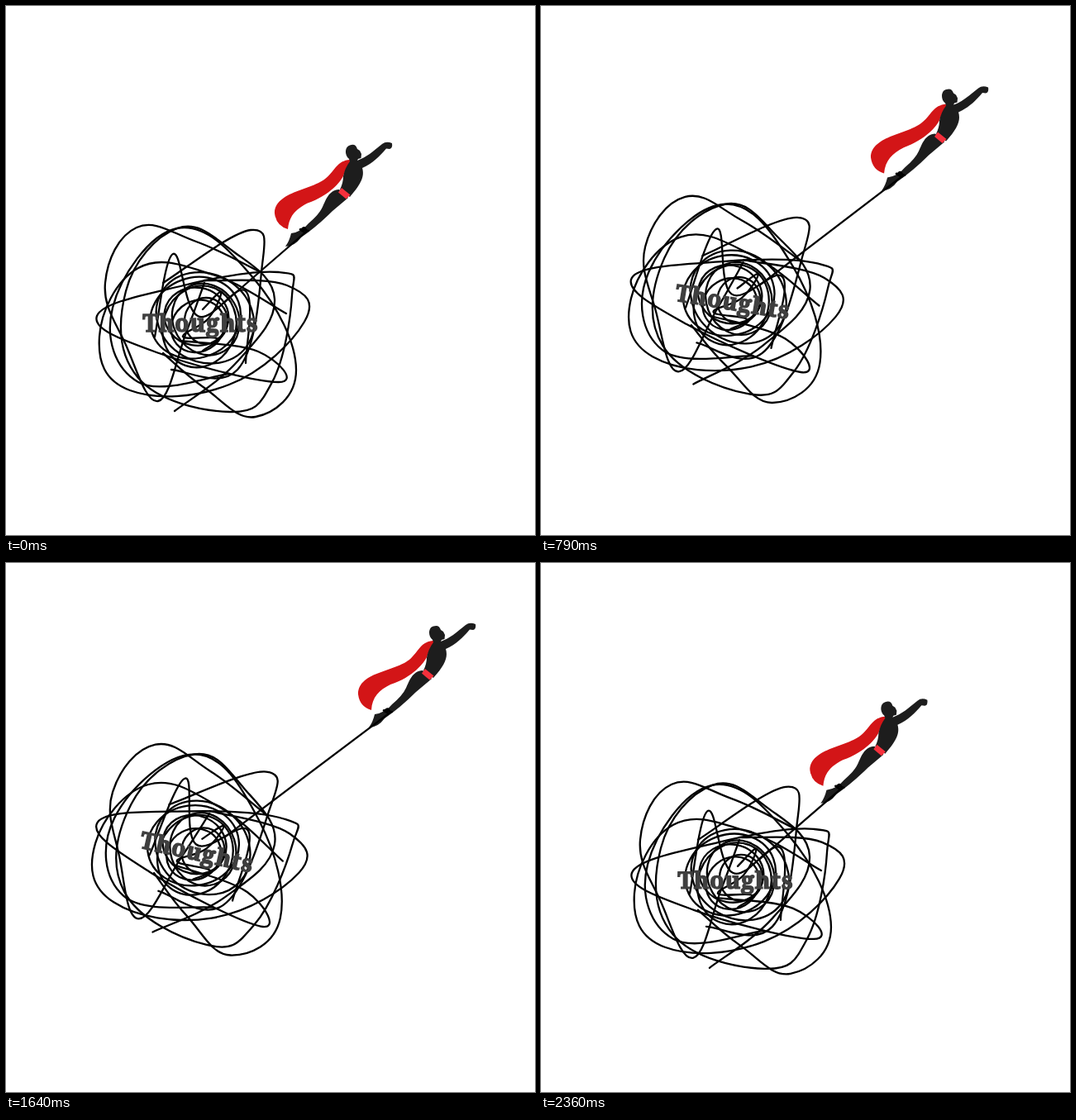
An HTML page that plays this animation: 640 px wide and 640 px high, repeating every 2.43 s.

```html
<!DOCTYPE html>
<html lang="en">
<head>
<meta charset="utf-8">
<title>Thoughts</title>
<style>
  html, body { margin: 0; width: 100%; height: 100%; overflow: hidden; background: #fff; }
  svg { display: block; width: 100%; height: 100%; }
  .line { fill: none; stroke: #000; stroke-width: 2.3; stroke-linecap: round; stroke-linejoin: round; }
  text { font: 900 28px "Noto Serif", "Liberation Serif", serif; letter-spacing: 1px;
    fill: #3f3f3f; stroke: #3f3f3f; stroke-width: 1.5; text-anchor: middle; }
</style>
</head>
<body>
<svg viewBox="0 0 640 640">
  <g id="ball">
    <g id="tangle" class="line"></g>
    <text x="235.5" y="394">Thoughts</text>
  </g>
  <g id="hero">
    <path id="cape" fill="#d31517"/>
    <g fill="#1d1d1d">
      <path d="M415,185C409,180 410,170 416,168.500Q423,166 425,173L428,175L430,179L429.500,184L426,185L425,187
        C436,183 444,176 455,167Q460,163 467,166Q468,172 464,173L460,172.500C452,182 444,190 431,196
        C434,206 430,215 416,231L404,222Q408,214 408,206Q410,196 416,188Z"/>
      <path d="M403,222C390,223 387,235 383,243Q379,252 366,263Q358,273 345,275Q343,284 338,291
        Q349,291 357,280Q376,267 395,248L414,232Z"/>
    </g>
    <path d="M406,220L416.500,228.500L411.500,233.500L402,225.500Z" fill="#f5303c"/>
  </g>
  <path id="rope" class="line"/>
  <path id="knot" class="line" d="M358,270Q361,266 363,271T358,272T366,272"/>
</svg>
<script>
const $ = id => document.getElementById(id);

// Smooth curve through a few key points
function curve(text) {
  const p = text.split(' ').map(pair => pair.split(',').map(Number));
  let d = 'M' + p[0];
  for (let i = 0; i < p.length - 1; i++) {
    const a = p[i - 1] || p[i], b = p[i], c = p[i + 1], e = p[i + 2] || c;
    const c1 = b.map((v, n) => v + (c[n] - a[n]) / 5);
    const c2 = c.map((v, n) => v - (e[n] - b[n]) / 5);
    d += `C${c1} ${c2} ${c}`;
  }
  return d;
}

function add(tag, attrs) {
  const el = document.createElementNS('http://www.w3.org/2000/svg', tag);
  for (const name in attrs) el.setAttribute(name, attrs[name]);
  $('tangle').append(el);
}

// Wide outer loops
[
  '308,322 230,285 158,268 120,335 145,410 184,478 218,395 240,335',
  '204,490 280,430 325,355 275,297 207,269 145,345 160,450 270,491 322,455 346,350 330,322 215,338 110,375 185,420 330,455 305,418 210,405',
  '190,335 296,271 309,322 280,440 200,440',
  '190,420 240,462 302,497 351,440 300,330 207,269 129,365 160,455 270,445',
  '240,332 340,338 361,382 270,458 150,465 113,400 160,317 250,325 339,372',
  '180,400 202,300 232,375 290,345 290,432',
  '238,367 260,346 245,378 214,400 255,402 238,417'
].forEach(points => add('path', { d: curve(points) }));

// Inner rings, wider and taller towards the outside
for (let i = 0; i < 7; i++) {
  const cx = 235 + 7 * Math.cos(2 * i), cy = 381 + 7 * Math.sin(2 * i);
  add('ellipse', { cx, cy, rx: 26 + 4.5 * i, ry: 28 + 5.5 * i, transform: `rotate(${i * 50} ${cx} ${cy})` });
}

const LOOP = 2430, STEPS = 34, PEAK = 19, REACH = 139;
const ease = u => u * u * (2.4 - 1.4 * u);

function draw(time) {
  const step = Math.floor((time % LOOP + 6) / LOOP * STEPS) % STEPS;
  const s = REACH * ease(step < PEAK ? step / PEAK : (33.5 - step) / (33.5 - PEAK));
  const rise = .91 * s;
  const angle = .124 * s;
  const x = 235 - .04 * s, y = 383 - .395 * s + .00055 * s * s;
  const loose = Math.abs(step - 18.5) < 2;

  $('ball').setAttribute('transform', `translate(${x} ${y}) rotate(${angle}) translate(-235 -383)`);
  for (const id of ['hero', 'knot']) $(id).setAttribute('transform', `translate(${s} ${-rise})`);
  $('knot').style.display = loose ? 'none' : '';

  // The cape billows as k goes from 0 to 1
  const k = (1 + Math.cos((step - 1) * 2 * Math.PI / 11)) / 2;
  $('cape').setAttribute('d', `M424,186C402,184 400,${199 - 3 * k} ${385 + 5 * k},206
    C${366 + 8 * k},${216 + 8 * k} 325,${236 - 14 * k} 325,251Q327,266 341,270
    C${347 - 5 * k},254 ${358 - 8 * k},${243 + 3 * k} ${374 - 10 * k},${233 + 6 * k}
    C392,${221 + 9 * k} 405,212 408,${203 + 3 * k}Q411,196 418,188Z`);

  // The rope runs from inside the ball to the ankle, unless it has slipped off
  const r = angle * Math.PI / 180, cos = Math.cos(r), sin = Math.sin(r);
  $('rope').setAttribute('d', `M${x + 30 * cos + 25 * sin},${y + 30 * sin - 25 * cos}` + (loose
    ? 'C340,291 470,238 507,216Q514,208 525,203Q529,200 530,192'
    : `L${362 + s},${274 - rise}`));
}

const start = performance.now();
function tick() {
  draw(performance.now() - start);
  requestAnimationFrame(tick);
}
tick();
</script>
</body>
</html>
```
